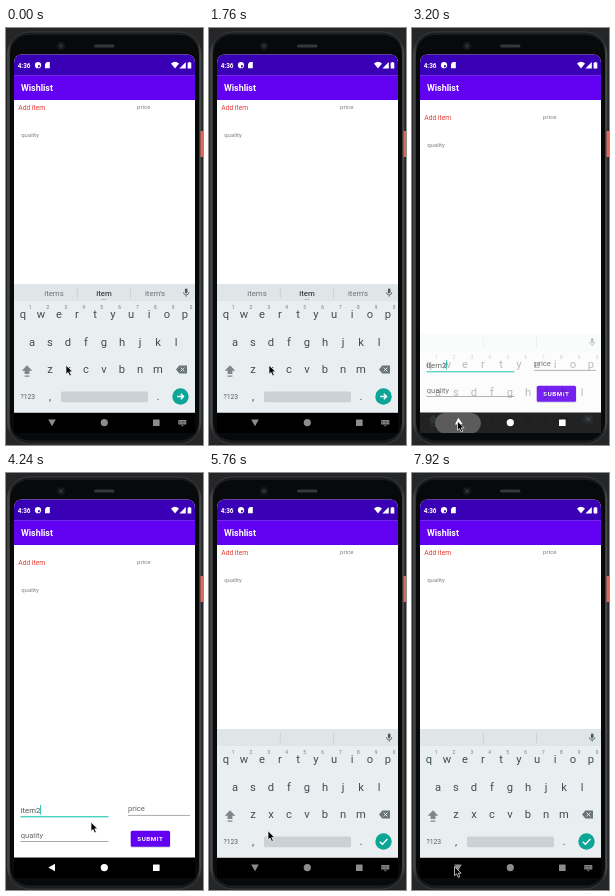
An HTML page that plays this animation: 197x417 px, repeating every 8000 ms.

```html
<!DOCTYPE html>
<html lang="en">
<head>
<meta charset="utf-8">
<title>Wishlist</title>
<style>
html, body { margin: 0; width: 100%; height: 100%; overflow: hidden; background: #252628; }
svg { display: block; width: 197px; height: 417px; font-family: Roboto, "Open Sans", sans-serif; }
</style>
</head>
<body>
<svg id="stage" viewBox="0 0 197 417">
  <defs>
    <clipPath id="screen"><path d="M8 405V35Q8 26.5 16 26.5H181Q189 26.5 189 35V405Z"/></clipPath>
    <linearGradient id="edge" x1="0" x2="1" y1="0" y2="0">
      <stop offset="0" stop-color="#505153"/><stop offset=".02" stop-color="#1b1c1e"/>
      <stop offset=".98" stop-color="#1b1c1e"/><stop offset="1" stop-color="#505153"/>
    </linearGradient>
  </defs>

  <rect width="197" height="417" fill="#252628"/>
  <rect x="1.5" y="4" width="193.5" height="412" rx="22" fill="url(#edge)" stroke="#454648" stroke-width=".7"/>
  <rect x="4" y="7" width="189" height="405.5" rx="19" fill="#08090b"/>
  <rect x="194.5" y="103" width="3" height="26" fill="#e0695c"/>
  <circle cx="55" cy="18" r="4" fill="#16181b"/>
  <circle cx="55" cy="18" r="1.8" fill="#303237"/>
  <rect x="88" y="16.4" width="20.5" height="3.2" rx="1.6" fill="#35373a"/>

  <g clip-path="url(#screen)">
    <rect x="8" y="26" width="181" height="359" fill="#fff"/>
    <rect x="8" y="384.5" width="181" height="21" fill="#000"/>
    <rect x="8" y="26" width="181" height="21.5" fill="#3a00b5"/>
    <rect x="8" y="47.3" width="181" height="24.7" fill="#6200f2"/>
    <g id="bar" fill="#fff">
      <circle cx="32" cy="37.2" r="3.1"/>
      <path d="M32 37.2H34.2A2.2 2.2 0 0 1 32 39.4Z" fill="#3a00b5"/>
      <path d="M39 35.9L40.8 34.1H43.8V40.3H39Z"/>
      <path d="M165 35.5Q169 32.2 173 35.5L169 40.4Z"/>
      <path d="M179.8 34V40.4H173.4Z"/>
      <path d="M181.6 34.8H182.6V34H184.3V34.8H185.3V40.4H181.6Z"/>
    </g>
    <g id="list"></g>
    <g id="form">
      <path id="line1" d="M14.5 343.8H102.5"/>
      <path d="M122 342.4H184" stroke="#858585" stroke-width=".7"/>
      <path id="line2" d="M14.5 368.5H102.5"/>
      <rect x="125" y="359" width="39.5" height="15.8" rx="1.5" fill="#000" opacity=".16"/>
      <rect x="124.7" y="357.8" width="39.3" height="16" rx="1.5" fill="#6200f2"/>
      <rect id="caret" width=".9" height="9.5" fill="#03bfad"/>
    </g>
    <g id="keys">
      <g id="board">
        <rect x="8" y="256" width="181" height="128.5" fill="#e9eef0"/>
        <rect x="8" y="256" width="181" height="17" fill="#e0e6e8"/>
      </g>
      <path d="M71.3 260V270M124.5 260V270" stroke="#c3cbce" stroke-width=".7"/>
      <g id="words"></g>
      <g fill="#4d5a60">
        <rect x="178.9" y="260.4" width="2.6" height="5" rx="1.3"/>
        <path d="M177.5 264.2A2.7 2.7 0 0 0 182.9 264.2M180.2 267V268.8" fill="none" stroke="#4d5a60" stroke-width=".8"/>
        <path d="M21 337.3L26.3 342.8H23.4V346H18.6V342.8H15.7Z" fill="#7d888d"/>
        <path d="M18.6 347.5H23.4V348.8H18.6Z" fill="#7d888d"/>
        <path d="M170 341.5L173.3 337.4H181V345.6H173.3Z" fill="#69757b"/>
        <path d="M174.6 339.6L178.4 343.4M178.4 339.6L174.6 343.4" stroke="#e9eef0" stroke-width=".9"/>
      </g>
      <rect x="55" y="363.5" width="87" height="10.8" rx="1.5" fill="#cbd1d4"/>
      <circle cx="174.5" cy="368.5" r="8.2" fill="#0ca596"/>
      <path id="enter" fill="none" stroke="#fff" stroke-width="1.3"/>
    </g>
    <rect id="ripple" x="23" y="385" width="46" height="20.5" rx="10" fill="#6a6a6a"/>
    <g id="nav">
      <path id="back" d="M42.3 394.5L49 390.7V398.3Z"/>
      <circle cx="98.3" cy="394.6" r="3.6"/>
      <rect x="147" y="391.4" width="6.6" height="6.6" rx=".5"/>
      <g id="ime">
        <rect x="172.3" y="392" width="8" height="4.6" rx=".6"/>
        <path d="M173.2 393.4H179.4M173.2 394.9H179.4" stroke="#000" stroke-width=".6" stroke-dasharray=".8 .6"/>
        <path d="M174.8 397.3H177.8L176.3 398.6Z"/>
      </g>
    </g>
  </g>
  <path id="mouse" d="M0 0V9L2.1 7.2L3.7 10.7L5.3 10L3.8 6.6H6.6Z" fill="#000" stroke="#fff" stroke-width=".7"/>
</svg>
<script>
const $ = id => document.getElementById(id);
const LOOP = 8000;
const TEAL = '#03bfad';

function text(parent, str, x, y, size, fill, more = {}) {
  const el = document.createElementNS('http://www.w3.org/2000/svg', 'text');
  const attrs = { x, y, 'font-size': size, fill, ...more };
  for (const k in attrs) el.setAttribute(k, attrs[k]);
  el.textContent = str;
  $(parent).append(el);
  return el;
}
function set(id, attrs) {
  for (const k in attrs) $(id).setAttribute(k, attrs[k]);
}

const mid = { 'text-anchor': 'middle' };

text('bar', '4:36', 11.7, 39.7, 6.4, '#fff', { 'font-weight': 700 });
text('bar', 'Wishlist', 15, 63.2, 8.9, '#fff', { 'font-weight': 700 });
text('list', 'Add item', 12.3, 91.5, 6.7, '#e53935');
text('list', 'price', 131, 91.2, 6.1, '#808080');
text('list', 'quality', 15.2, 119.2, 6, '#808080');
text('form', 'item2', 14.7, 339.7, 7.7, '#555');
text('form', 'price', 122, 338.4, 7.7, '#666');
text('form', 'quality', 14.7, 365, 7.6, '#666');
text('form', 'SUBMIT', 131.3, 368.1, 6.2, '#fff', { 'font-weight': 700, 'letter-spacing': .55 });

// letter rows: characters, first x, baseline
[['qwertyuiop', 17, 290.2], ['asdfghjkl', 26, 318], ['zxcvbnm', 44, 345.3]].forEach(([row, x, y]) =>
  [...row].forEach((c, i) => text('keys', c, x + i * 18, y, 11.2, '#414d53', mid)));
[...'1234567890'].forEach((c, i) => text('keys', c, 24 + i * 17.9, 281, 4.8, '#6f7b80', mid));
text('keys', '?123', 21.8, 371.3, 6.8, '#56636a', mid);
text('keys', ',', 44, 372, 11, '#414d53', mid);
text('keys', '.', 152, 372, 11, '#414d53', mid);

const words = [48, 98, 149].map((x, i) =>
  text('words', '', x, 268, 7.8, i === 1 ? '#37434a' : '#68757b', { ...mid, 'font-weight': i === 1 ? 500 : 400 }));
const dots = text('words', '•••', 98, 273.2, 4, '#4d5a60', mid);

// start time, three suggestions
const hints = [
  [0, 'items', 'item', "item's"],
  [2160, '', '', ''],
  [5920, 'quality', 'qualit', 'qualities'],
  [6480, 'qualities', 'quality', "quality's"],
  [6880, '', '', '']
];

// time, x, y of the pointer tip
const path = [
  [0, 60, 337.2], [2000, 60, 337.2], [2640, 45.5, 393.2], [3440, 45.5, 393.2],
  [4080, 85, 349.2], [4320, 85, 349.2], [4880, 59, 357.8], [7200, 59, 357.8],
  [7760, 42.5, 393.6], [LOOP, 42.5, 393.6]
];

const HIDE = 3040, SHOW = 5400, FOCUS = 5320;
const ramp = (t, a, b) => Math.min(1, Math.max(0, (t - a) / (b - a)));
const ease = p => p * p * (3 - 2 * p);

function pointer(t) {
  const i = path.findIndex(p => p[0] > t);
  const [t0, x0, y0] = path[i - 1], [t1, x1, y1] = path[i];
  const p = ease(ramp(t, t0, t1));
  return [x0 + (x1 - x0) * p, y0 + (y1 - y0) * p];
}

function draw(t) {
  const down = t < SHOW ? ramp(t, HIDE, HIDE + 260) : 1 - ramp(t, SHOW, SHOW + 240);
  const open = t < HIDE || t >= SHOW + 240;
  const second = t >= FOCUS;

  set('list', { transform: `translate(0 ${open ? -9.8 : 0})` });
  set('form', { display: open ? 'none' : 'inline' });
  set('keys', { transform: `translate(0 ${down * 80})`, opacity: 1 - down });
  set('board', { opacity: 1 - down });

  const on = { stroke: TEAL, 'stroke-width': 1 }, off = { stroke: '#858585', 'stroke-width': .7 };
  set('line1', second ? off : on);
  set('line2', second ? on : off);
  set('caret', { x: second ? 14.2 : 34.2, y: second ? 357.5 : 332, opacity: t % 1000 < 500 ? 1 : 0 });

  const hint = hints.filter(h => h[0] <= t).pop();
  words.forEach((w, i) => w.textContent = hint[i + 1]);
  dots.setAttribute('opacity', hint[2] ? 1 : 0);
  set('enter', { d: t < SHOW ? 'M171.2 368.5H177.4M174.8 365.7L177.6 368.5L174.8 371.3' : 'M170.8 368.7L173.4 371.3L178.4 366' });

  set('nav', { fill: down > 0 ? '#fff' : '#8c8c8c' });
  set('back', { transform: `rotate(${-90 * (1 - down)} 46 394.5)` });
  set('ime', { display: down > 0 ? 'none' : 'inline' });
  set('ripple', { opacity: .8 * ramp(t, 2960, 3080) * (1 - ramp(t, 3280, 3640)) });
  set('mouse', { transform: `translate(${pointer(t)})` });
}

const start = performance.now();
function tick() {
  draw((performance.now() - start) % LOOP);
  requestAnimationFrame(tick);
}
tick();
</script>
</body>
</html>
```
